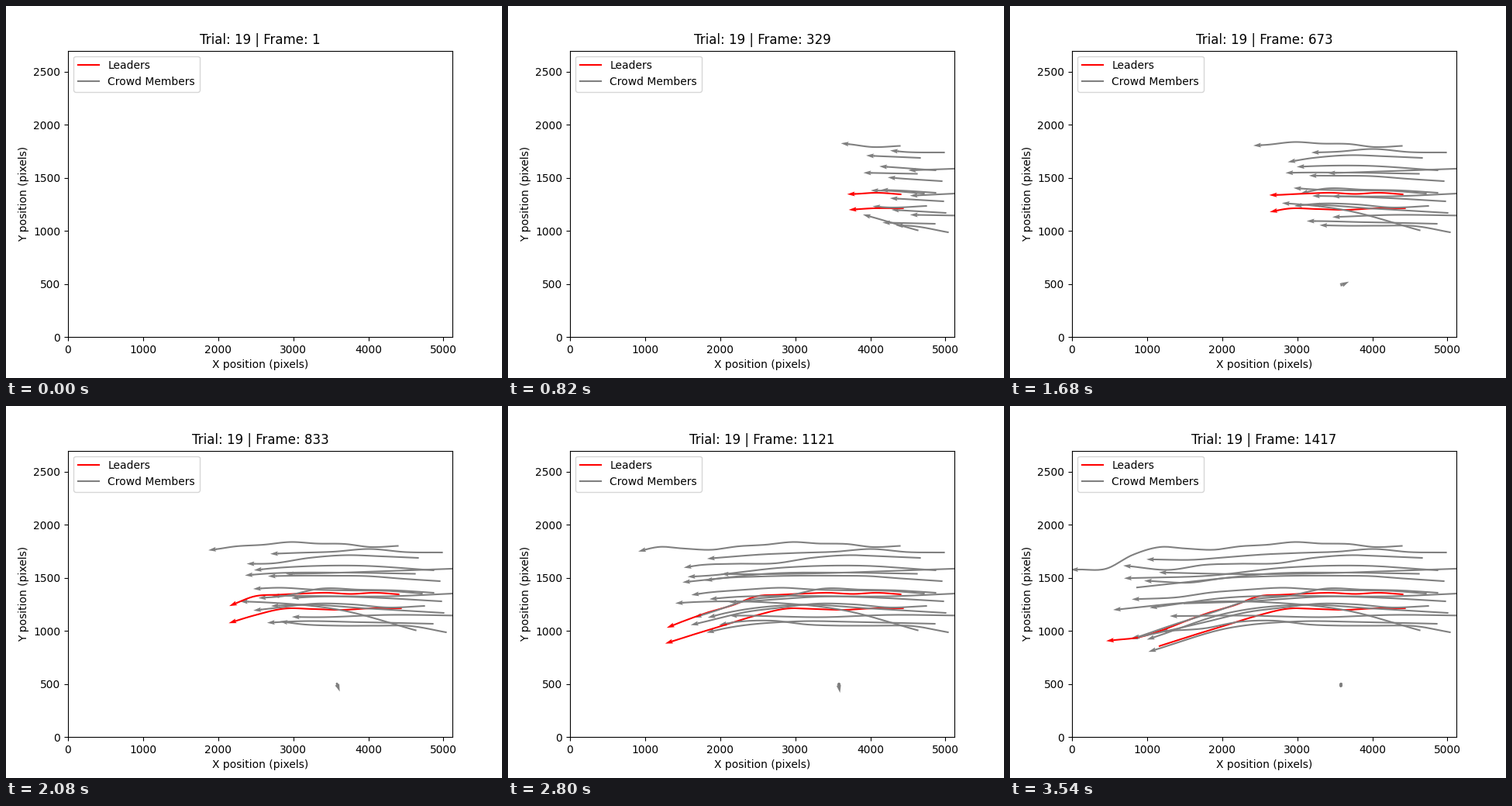
These frames come from a looping animation (640x480 px, 3560 ms). A matplotlib script:

```python
import numpy as np
import matplotlib.pyplot as plt
from matplotlib.animation import FuncAnimation

FRAMES, STEP = 178, 8
HEAD = 11                       # arrow length in pixels
frames = np.arange(FRAMES)

fig = plt.figure(figsize=(6.4, 4.8), dpi=100)
ax = fig.add_subplot()
ax.set(xlim=(0, 5120), ylim=(0, 2700),
       xlabel="X position (pixels)", ylabel="Y position (pixels)")
title = ax.set_title("")
ax.plot([], [], color="red", label="Leaders")
ax.plot([], [], color="gray", label="Crowd Members")
ax.legend(loc="upper left")


def curve(heights, u):
    """Smooth curve through evenly spaced heights, for u from 0 to 1."""
    h = np.array(heights, float)
    m = np.gradient(h)
    q = np.clip(u, 0, 1) * (len(h) - 1)
    i = np.minimum(q.astype(int), len(h) - 2)
    s = q - i
    ease = s * s * (3 - 2 * s)
    return (h[i] + (h[i + 1] - h[i]) * ease
            + s * (1 - s) ** 2 * m[i] - s * s * (1 - s) * m[i + 1])


def walk_progress():
    """Stand, set off softly, keep a steady pace, slow down a little."""
    pace = 5 * np.log1p(np.exp((frames - 17) / 5))
    return 1 - (1 - pace / pace[-1]) ** 1.05


progress = walk_progress()
lines, paths, angles, spans, colors = [], [], [], [], []


def add_track(x, y, angle, first, last, color):
    """Store a path given in stage pixels, y downwards."""
    paths.append(np.column_stack([(x - 80) * 5120 / 496, (427.2 - y) * 2700 / 369.6]))
    angles.append(angle)
    spans.append((first, last))
    colors.append(color)
    lines.extend(ax.plot([], [], color=color, lw=1.5))


def walker(x0, x1, *heights, color="gray", stop=0):
    """Walk from x0 to x1 along the heights; tracking is lost at x = stop."""
    x = x0 + (x1 - x0) * progress
    last = frames[x > stop][-1]
    x = np.maximum(x, stop)
    y = curve(heights, (x - x0) / (x1 - x0))
    angle = np.arctan2(-np.diff(y, prepend=y[0]), np.diff(x, prepend=x[0]))
    add_track(x, y, angle, 0, last, color)


def bystander():
    """Shift about on one spot while turning from up right to down."""
    k = frames - 78
    turn = np.interp(k, [0, 26, 62], [55, -70, -80])
    add_track(427 + 0.6 * np.sin(0.37 * k), 359.8 + 1.6 * np.sin(0.21 * k - 0.8),
              np.radians(turn), 78, 140, "gray")


# leaders
walker(507, 135, 243, 241, 242.5, 241, 242, 243.5, 245.5, 257, 266, 277, 289, 298.5, 302,
       color="red")
walker(510, 132, 261, 261, 263, 262, 261.5, 270, 281.5, 293, 305, 317, 328,
       color="red", stop=193)
# crowd, from top to bottom
walker(506, 89, 180.5, 182, 178, 177.5, 175.5, 179, 181, 185.5, 184, 182, 192, 210, 211)
walker(532, 157, 196, 194, 192.5, 196, 203, 203.5, 205, 211.5, 207)
walker(563, 187, 189, 188.5, 184.5, 188, 189.5, 191.5, 195, 198.5, 198)
walker(552, 158, 212, 206, 208.5, 219, 222)
walker(588, 203, 209.5, 213, 216, 217, 215)
walker(528, 156, 216.5, 215, 216, 225, 235, stop=164)
walker(560, 184, 226, 223, 219.5, 219, 219, 220, 222, 228, 226)
walker(537, 168, 242, 238.5, 238, 237, 234.5, 237, 240.5, 247, 249)
walker(552, 168, 241, 238, 237, 235.5, 245, 250, 265.5, 280.5, 297)
walker(588, 216, 241.5, 245.5, 246, 252, 255, stop=225)
walker(562, 191, 252, 247, 245, 247, 259)
walker(540, 166, 258, 260, 256, 255, 260, 266, 277, 288, 298)
walker(565, 187, 267, 261.5, 256.5, 267, 298)
walker(588, 217, 270.5, 269.5, 272.5, 270.5, 271)
walker(529, 144, 289.5, 263.5, 253.5, 253, 262)
walker(551, 189, 281, 279, 278, 287, 314)
walker(568, 205, 292, 284, 283.5, 283.5, 282, 277, 278.5, 287, 290)
bystander()

paths, angles = np.array(paths), np.array(angles)
first, last = np.array(spans).T
heads = ax.quiver(paths[:, 0, 0], paths[:, 0, 1], HEAD * np.cos(angles[:, 0]),
                  HEAD * np.sin(angles[:, 0]), color=colors, width=0.004,
                  scale=1, scale_units="dots", angles="uv")


def update(n):
    title.set_text(f"Trial: 19 | Frame: {1 + STEP * n}")
    for line, path, start in zip(lines, paths, first):
        line.set_data(*path[start:n + 1].T)
    hidden = (n <= first) | (n > last)
    heads.set_offsets(paths[:, n])
    heads.set_UVC(np.ma.array(HEAD * np.cos(angles[:, n]), mask=hidden),
                  np.ma.array(HEAD * np.sin(angles[:, n]), mask=hidden))


anim = FuncAnimation(fig, update, frames=FRAMES, interval=20,
                     repeat=True, repeat_delay=0, blit=False)
plt.show()
```
